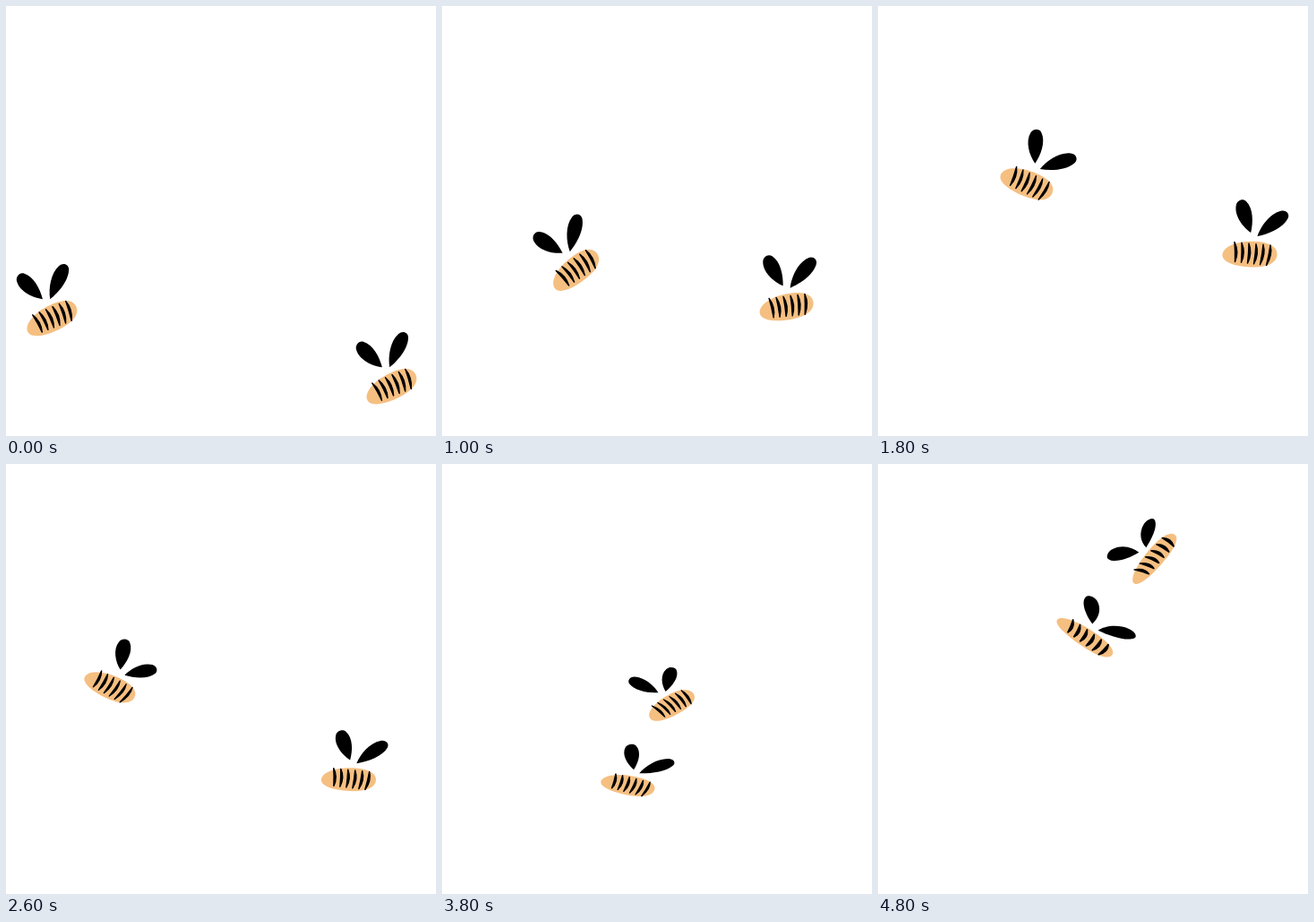
Animation, 480 px wide and 480 px high, one loop 5000 ms. Source, as an HTML page:

```html
<!DOCTYPE html>
<html lang="en">
<head>
<meta charset="utf-8">
<title>Two bees</title>
<style>
html, body { margin: 0; width: 100%; height: 100%; overflow: hidden; background: #fff; }
svg { display: block; width: 100%; height: 100%; }
</style>
</head>
<body>
<svg id="stage" viewBox="0 0 480 480"></svg>
<script>
const STEP = 200, LOOP = 5000, KNOT = 400;
const WING = 'M0 0C-7 -9 -12 -24 -6.5 -34C-4 -39 3 -39.5 5.5 -35C11 -25 6 -10 0 0Z';
const BODY = 'M-30.5 0C-29 -9 -14 -14.3 2 -14.3C20 -14.3 30.5 -9 30.5 0C30.5 9.5 20 14.5 5 14.5C-14 14.5 -32 9.5 -30.5 0Z';

// knots: x, y, tilt every KNOT ms, the first half a knot before the start
// turn: late rotation of the whole bee, fold: how much the right wing shortens
const BEES = [
  {
    turn: -40, fold: .14,
    knots: [
      [73.5, 331, -26], [37, 362, -30], [105, 323, -35], [149, 295, -39.5],
      [161, 240, -12], [166, 198, 20], [126, 220, 23], [116, 248.5, 26],
      [131, 289, 25], [213, 301, 6], [256, 269.5, -40], [267.5, 211, -32],
      [284, 144, -26], [330, 76, -14]
    ]
  },
  {
    turn: 36, fold: 0,
    knots: [
      [402, 409, -30], [453, 435, -25], [412, 387.5, -19], [384.5, 336, -12],
      [376, 283.5, -6], [415, 277, 0], [418, 316, 0], [382.5, 352, 1],
      [349.5, 373, -14], [294, 376, -12], [207.5, 358.5, 13], [209, 295, 5],
      [213, 221.5, -4], [248.5, 174, -8]
    ]
  }
];

const stage = document.getElementById('stage');

function add(parent, tag, attrs) {
  const el = document.createElementNS('http://www.w3.org/2000/svg', tag);
  for (const key in attrs) el.setAttribute(key, attrs[key]);
  return parent.appendChild(el);
}

function stripe(i) {
  const x0 = -17 + 8 * i, y0 = -13.5 + .7 * i;
  const x1 = -16.5 + 7 * i, y1 = 8.5 + .8 * i;
  const cx = (x0 + x1) / 2 + 2.8, cy = (y0 + y1) / 2;
  return `M${x0} ${y0}Q${cx + 2.2} ${cy} ${x1} ${y1}Q${cx - 2.2} ${cy} ${x0} ${y0}Z`;
}

function makeBee(bee) {
  bee.el = add(stage, 'g', {});
  add(bee.el, 'path', { d: WING, transform: 'translate(1.2 -24) rotate(-17.5)' });
  bee.wing = add(bee.el, 'path', { d: WING });
  add(bee.el, 'path', { d: BODY, fill: '#f5bf81' });
  add(bee.el, 'path', {
    d: [0, 1, 2, 3, 4, 5].map(stripe).join(''),
    stroke: '#000', 'stroke-width': 1.4, 'stroke-linejoin': 'round'
  });
}

// Progress from 0 to 1 between two times
const ramp = (t, from, to) => Math.min(1, Math.max(0, (t - from) / (to - from)));

// Smooth curve through evenly spaced knots
function spline(knots, t) {
  const pos = t / KNOT + .5, i = Math.floor(pos), u = pos - i;
  const at = n => knots[Math.min(knots.length - 1, Math.max(0, n))];
  const [a, b, c, d] = [at(i - 1), at(i), at(i + 1), at(i + 2)];
  return b.map((v, j) => v + u / 2 * (c[j] - a[j]
    + u * (2 * a[j] - 5 * v + 4 * c[j] - d[j]
    + u * (3 * (v - c[j]) + d[j] - a[j]))));
}

function drawBee(bee, t) {
  const [x, y, tilt] = spline(bee.knots, t);
  const late = ramp(t, 3800, 4800);
  const sx = 1 + .2 * late;
  const sy = 1 - .25 * ramp(t, 1800, 3800) - .05 * late;
  const wing = 1.12 * (1 - bee.fold * ramp(t, 1800, 2600));
  bee.el.setAttribute('transform',
    `translate(${x} ${y}) rotate(${bee.turn * late}) scale(${sx} ${sy}) rotate(${tilt})`);
  bee.wing.setAttribute('transform', `translate(8.5 -20) rotate(52) scale(.95 ${wing})`);
}

const start = performance.now();

function frame() {
  const now = (performance.now() - start) % LOOP;
  const t = Math.floor(now / STEP) * STEP;
  for (const bee of BEES) drawBee(bee, t);
  requestAnimationFrame(frame);
}

BEES.forEach(makeBee);
frame();
</script>
</body>
</html>
```
